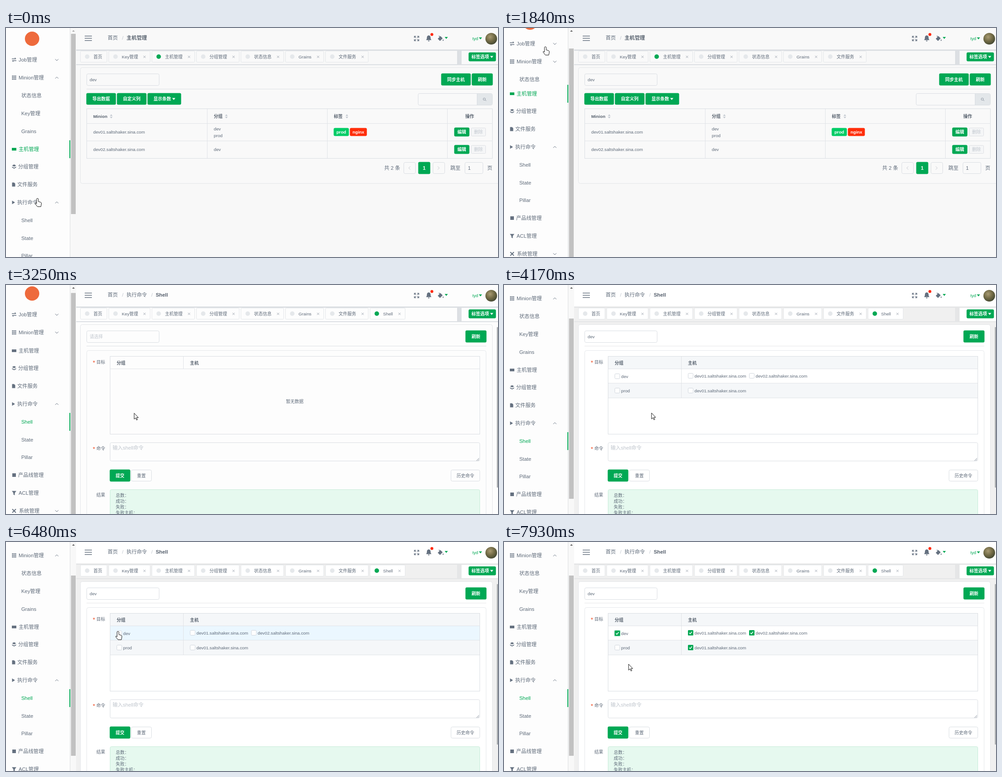
These frames come from a looping animation (1094x512 px, 8000 ms). An HTML page:

```html
<!DOCTYPE html>
<html lang="zh-CN">
<head>
<meta charset="utf-8">
<title>Shell</title>
<style>
html, body { margin: 0; width: 100%; height: 100%; overflow: hidden; background: #f8f8f8; }
#stage {
  --bg: #f8f8f8; --card: #f9f9f9; --head: #f8f8f8; --line: #dcdfe3;
  display: block; width: 1094px; height: 512px;
  font: 9.75px "Liberation Sans", Arial, "Noto Sans CJK SC", "Noto Sans CJK", sans-serif;
}
#stage.fresh { --bg: #fdfdfd; --card: #fdfdfd; --head: #fdfdfd; }
#stage.ready { --bg: #f0f0f0; --card: #fff; --head: #f5f7f9; --line: #e5e6e7; }
text { fill: #5e6a79; white-space: pre; }
.l { font-size: 11.375px; }
.b { font-weight: bold; fill: #56606d; }
.c { text-anchor: middle; }
.w { fill: #fff; font-weight: bold; }
.m { fill: #bfc5cd; }
.g { fill: #00a854; }
.star { font-size: 13px; fill: #ed3f14; }
.wide { font-family: "Liberation Sans", "Noto Sans CJK JP", "Noto Sans CJK", sans-serif; }
.bg { fill: var(--bg); }
.card { fill: var(--card); }
.head { fill: var(--head); }
.line { fill: var(--line); }
.edge { fill: none; stroke: #d9dde2; }
.soft { fill: none; stroke: #e4e7ea; }
.tab { fill: var(--card); stroke: #e3e6e9; }
.frame { fill: var(--card); stroke: #e3e5e8; }
.result { fill: #e6f9ef; stroke: #c5ebd7; }
.check { fill: #fff; stroke: #cfd5dc; }
.tick { fill: none; stroke: #fff; stroke-width: 1.5; }
.btn { fill: #00a854; }
.off { fill: #f5f6f7; stroke: #dddfe3; }
.ico { fill: #657180; }
.pen { fill: none; stroke: #657180; }
.thin { fill: none; stroke: #8b94a0; }
.item rect { fill: none; }
.item.hot .back { fill: #f2f2f2; }
.item.on .bar, .item.on .ico, .item.on text { fill: #00a854; }
.cur { fill: #fff; stroke: #111; stroke-linejoin: round; }
#ring { opacity: .2; }
</style>
</head>
<body>
<svg id="stage" viewBox="0 0 1094 512"></svg>
<script>
const LOOP = 8000, PITCH = 39.82, SUB = 119, RULE = '#e0e3e7';

// drawing helpers; text is placed by its vertical centre, paint is a colour or a class
const paint = p => p[0] === '#' ? `fill="${p}"` : `class="${p}"`;
const txt = (x, cy, s, cls = '') =>
  `<text x="${x}" y="${cy + (/\bl\b/.test(cls) ? 4 : 3.5)}" class="${cls}">${s}</text>`;
const fill = (x, y, w, h, p, r = 0) =>
  `<rect x="${x}" y="${y}" width="${w}" height="${h}" rx="${r}" ${paint(p)}/>`;
const box = (x, y, w, h, cls, r = 3) => fill(x + .5, y + .5, w - 1, h - 1, cls, r);
const solid = (x, y, w, h, p = 'btn') => fill(x - .4, y - .4, w + .8, h + .8, p, 3);
const path = (x, y, d, cls, extra = '') =>
  `<path transform="translate(${x} ${y})" d="${d}" class="${cls}" ${extra}/>`;
const group = (id, body, cls = '') => `<g id="${id}" class="${cls}">${body}</g>`;
const disc = (x, y, r, color) => `<circle cx="${x}" cy="${y}" r="${r}" fill="${color}"/>`;
const caret = (x, y, cls) => path(x, y, 'M-3.500-2H3.500L0 2.500Z', cls);
const cross = (x, y) => path(x, y, 'M-2.500-2.500l5 5m0-5l-5 5', 'thin', 'stroke-width=".8"');
const button = (x, y, w, h, s, p) => solid(x, y, w, h, p) + txt(x + w / 2, y + h / 2, s, 'w c');
const ghost = (x, y, w, h, s) => box(x, y, w, h, 'edge') + txt(x + w / 2, y + h / 2, s, 'c');
const sorter = (x, y) => path(x, y, 'M-3-1L0-4.500 3-1ZM-3 1L0 4.500 3 1Z', 'm');

// sidebar
const icons = {
  swap: ['M-5-2H4M1.500-4.500L4-2M5 2H-4M-1.500 4.500L-4 2', 'pen', 'stroke-width="1.3"'],
  grid: ['M-4.500-3.500h9M-4.500 0h9M-4.500 3.500h9', 'pen', 'stroke-width="2.300" stroke-dasharray="2.300 1.050"'],
  host: ['M-5-3H5V3H-5Z', 'ico'],
  layers: ['M0-5L4.500-2.500 0 0-4.500-2.500ZM-4.500 0L0 2.500 4.500 0V2L0 4.500-4.500 2Z', 'ico'],
  doc: ['M-4.500-4.500H0L2.500-2V4.500H-4.500Z', 'ico'],
  play: ['M-4.500-4L2-0-4.500 4Z', 'ico'],
  block: ['M-4-4H4V4H-4Z', 'ico'],
  funnel: ['M-5-4.500H5L1.500 0V5L-1.500 3.500V0Z', 'ico'],
  tools: ['M-4-4L4 4M4-4L-4 4', 'pen', 'stroke-width="2"']
};
const rowY = i => Math.round(71.45 + PITCH * i);
const chevron = (y, up) => path(113, y, up ? 'M-3.500 2L0-1.500 3.500 2' : 'M-3.500-1.500L0 2 3.500-1.500', 'pen');
const item = (i, x, label, icon, id = 'row' + i) => {
  const y = rowY(i);
  return group(id, fill(0, y - 20, 142, 40, 'back') + fill(141, y - 20, 2, 40, 'bar') +
    (icon ? path(18, y, ...icons[icon]) : '') + txt(x, y, label, 'l'), 'item');
};
const subTop = rowY(2) - 20;
const sidebar = fill(0, 0, 143, 512, '#fdfdfd') + fill(142, 0, 1, 512, '#dcdee0') +
  group('menu',
    disc(58, 24, 16, '#ee6a3c') +
    item(0, 28, 'Job管理', 'swap') + chevron(rowY(0), false) +
    item(1, 28, 'Minion管理', 'grid') +
    group('minionUp', chevron(rowY(1), true)) + group('minionDown', chevron(rowY(1), false)) +
    `<svg id="sub" x="0" y="${subTop}" width="143" height="${SUB}" overflow="hidden"><g transform="translate(0 ${-subTop})">` +
    item(2, 34, '状态信息', '', 'status') + item(3, 34, 'Key管理') + item(4, 34, 'Grains') + '</g></svg>' +
    group('lower',
      item(5, 28, '主机管理', 'host', 'hostItem') + item(6, 27, '分组管理', 'layers') +
      item(7, 25, '文件服务', 'doc') + item(8, 25, '执行命令', 'play') + chevron(rowY(8), true) +
      item(9, 34, 'Shell', '', 'shellItem') + item(10, 34, 'State') + item(11, 34, 'Pillar') +
      item(12, 27, '产品线管理', 'block') + item(13, 28, 'ACL管理', 'funnel') +
      item(14, 29, '系统管理', 'tools') + chevron(rowY(14), false))) +
  fill(144, 0, 12, 512, '#f8f8f8') +
  '<rect id="thumb" x="144.500" width="10.500" fill="#c1c1c1"/>' +
  '<path id="arrow" d="M147 8L150 5 153 8Z"/>';

// top bar and tabs
const tab = (x, w, label, color = '#e5e8eb') => box(x, 51, w, 26, 'tab', 2) +
  disc(x + 15.5, 64, 5, color) + txt(x + 29.5, 64.5, label) +
  (label === '首页' ? '' : cross(x + w - 13, 64.5));
const topBar = fill(156, 0, 938, 512, 'bg') + fill(156, 0, 938, 48, 'card') +
  fill(156, 48, 938, 3, 'line') + fill(156, 81, 938, 2, 'line') +
  path(175, 23, 'M0-5H16M0 0H16M0 5H16', 'pen', 'stroke-width="1.500"') +
  txt(226, 22, '首页', 'l') + txt(258, 22, '/', 'l m') +
  group('crumbHost', txt(268, 22, '主机管理', 'l b')) +
  group('crumbShell', txt(268, 22, '执行命令', 'l') + txt(323, 22, '/', 'l m') + txt(333, 22, 'Shell', 'l b')) +
  path(913, 23.5, 'M-5-1.500V-5H-1.500M1.500-5H5V-1.500M5 1.500V5H1.500M-1.500 5H-5V1.500M-4-4L-1.500-1.500M4-4L1.500-1.500M4 4L1.500 1.500M-4 4L-1.500 1.500', 'pen', 'stroke-width="1.300"') +
  path(940, 23, 'M-6 4Q-4 2-4-2Q-4-6 0-6.500Q4-6 4-2Q4 2 6 4ZM-2 5H2Q1.500 7 0 7Q-1.500 7-2 5Z', 'ico') +
  disc(947, 14.5, 3.2, '#ff2a0a') +
  path(966, 23, 'M-6 1L0-5 5 0-1 6ZM-3-6L0-3-1-2-4-5ZM6 2Q8 5 6 6Q4 5 6 2Z', 'ico') +
  caret(979, 22, 'g') + txt(1037, 23.5, 'tyd', 'g') + caret(1055, 23, 'g') +
  disc(1079, 24, 13, 'url(#photo)') +
  tab(165, 60, '首页') + tab(228, 93, 'Key管理') +
  group('tabHost', tab(324, 96, '主机管理', '#00a854')) +
  group('tabHostIdle', tab(324, 96, '主机管理')) +
  tab(423, 96, '分组管理') + tab(522, 96, '状态信息') + tab(621, 86, 'Grains') + tab(710, 96, '文件服务') +
  group('tabShell', tab(809, 79, 'Shell', '#00a854')) +
  fill(1003, 50, 10, 31, 'line') + fill(1013, 51, 81, 30, 'card') +
  solid(1029, 55, 60, 19) + txt(1035, 64.5, '标签选项', 'w') + caret(1080, 64.5, 'w');

// host list page
const hostRow = (y, n) => txt(194, y, `dev0${n}.saltshaker.sina.com`) +
  button(997, y - 9, 33, 19, '编辑') + box(1034, y - 9, 33, 19, 'off', 2) + txt(1050.5, y + .5, '删除', 'm c');
const hostPage = box(165, 88, 940, 260, 'frame', 4) +
  box(179, 102, 162, 27, 'edge') + txt(186, 115.5, 'dev') +
  button(968, 102, 65, 26, '同步主机') + button(1036, 102, 46, 26, '刷新') +
  fill(179, 136, 903, 1, 'line') +
  button(179, 146, 65, 25, '导出数据') + button(247, 146, 65, 25, '自定义列') +
  solid(315, 146, 74, 25) + txt(328, 158.5, '显示条数', 'w') + caret(373, 158.5, 'w') +
  box(916, 146, 166, 27, 'edge') + fill(1047, 147, 34, 25, '#e3e7ea') + fill(1047, 147, 1, 25, '#d9dde2') +
  path(1064, 159, 'M2 0A2.500 2.500 0 1 1-3 0A2.500 2.500 0 1 1 2 0M1.500 2L4 4', 'thin') +
  box(179, 180, 903, 112, 'edge', 0) +
  [213, 252].map(y => fill(179, y, 903, 1, RULE)).join('') +
  [447, 714, 981].map(x => fill(x, 181, 1, 110, RULE)).join('') +
  txt(194, 197.5, 'Minion', 'b') + sorter(234, 197.5) + txt(462, 197.5, '分组', 'b') + sorter(490, 197.5) +
  txt(729, 197.5, '标签', 'b') + sorter(758, 197.5) + txt(1031, 197.5, '操作', 'b c') +
  hostRow(232, 1) + hostRow(271, 2) +
  txt(462, 225, 'dev') + txt(462, 240, 'prod') + txt(462, 271.5, 'dev') +
  button(729, 224, 33, 17, 'prod', '#00cc66') + button(765, 224, 37, 17, 'nginx', '#ff2e0a') +
  txt(841, 313, '共 2 条', 'l') + box(884, 300, 27, 26, 'edge') + solid(917, 300, 26, 26) +
  box(949, 300, 27, 26, 'edge') + txt(930, 313, '1', 'l w c') +
  path(897, 313, 'M2-3.500L-1.500 0 2 3.500', 'thin', 'opacity=".5"') +
  path(962, 313, 'M-2-3.500L1.500 0-2 3.500', 'thin', 'opacity=".5"') +
  txt(988, 313, '跳至', 'l') + box(1020, 300, 41, 26, 'edge') + txt(1027, 313, '1', 'l') + txt(1070, 313, '页', 'l');

// shell page
const check = (x, y, label, id) => box(x, y, 12, 12, 'check', 2) +
  group(id, fill(x, y, 12, 12, 'btn', 1.5) + path(x + 6, y + 6, 'M-3 0L-1 2.500 3-2.500', 'tick')) +
  txt(x + 14.5, y + 6.5, label);
const shellPage = box(165, 88, 917, 440, 'frame', 4) +
  box(179, 102, 162, 27, 'edge') + group('pick', txt(186, 115.5, '请选择', 'm')) + group('picked', txt(186, 115.5, 'dev')) +
  button(1022, 102, 46, 26, '刷新') + fill(179, 136, 889, 1, 'line') +
  box(179, 146, 889, 400, 'soft', 4) +
  txt(193, 174, '*', 'star') + txt(201, 172, '目标') +
  txt(193, 367, '*', 'star') + txt(201, 365, '命令') + txt(201, 469, '结果') +
  fill(231, 160, 823, 28, 'head') +
  group('rows', fill(231, 220, 823, 32, '#f5f7f9') +
    group('hover', fill(231, 188, 823, 32, '#ebf7ff')) +
    fill(231, 219, 823, 1, RULE) + fill(231, 252, 823, 1, RULE) + fill(394, 188, 1, 64, RULE) +
    group('ring', fill(244.4, 196.4, 15.2, 15.2, 'btn', 3)) +
    check(246, 198, 'dev', 'devAll') + check(246, 230, 'prod', 'prodAll') +
    check(409, 197, 'dev01.saltshaker.sina.com', 'dev1') + check(545, 197, 'dev02.saltshaker.sina.com', 'dev2') +
    check(409, 230, 'dev01.saltshaker.sina.com', 'prod1')) +
  group('empty', txt(642, 260.5, '暂无数据', 'c')) +
  box(231, 159, 823, 175, 'edge', 0) + fill(231, 187, 823, 1, RULE) + fill(394, 160, 1, 28, RULE) +
  txt(246, 174, '分组', 'b') + txt(409, 174, '主机', 'b') +
  box(231, 352, 823, 42, 'edge') + txt(237, 364, '输入shell命令', 'l m') +
  path(1049, 390, 'M-3 3L3-3M0 3L3 0', 'thin') +
  button(231, 413, 45, 26, '提交') + ghost(278, 413, 46, 26, '重置') + ghost(989, 413, 65, 26, '历史命令') +
  box(231, 457, 823, 80, 'result') +
  ['总数', '成功', '失败', '失败主机'].map((s, i) => txt(244, 470.5 + 13 * i, s + '：', 'wide')).join('') +
  fill(1091.5, 94, 2.5, 359, '#a6a9ac', 1);

const stage = document.getElementById('stage');
stage.innerHTML =
  `<defs><radialGradient id="photo" cx=".4" cy=".35" r=".75"><stop stop-color="#a89a72"/>
   <stop offset=".5" stop-color="#716a45"/><stop offset="1" stop-color="#39402f"/></radialGradient></defs>` +
  topBar + group('hostPage', hostPage) + group('shellPage', shellPage) + sidebar +
  group('pointer',
    group('hand', path(0, 0, 'M-2 1.500Q-2 0 0 0Q2 0 2 1.500V7L7 8.500Q9 9 8.700 12L7.500 18.500H0L-5 12Q-5 9.500-3.500 10.500L-2 12Z', 'cur')) +
    group('tip', path(0, 0, 'M0 0V13.500L3.200 10.700L5.300 15.500L7.300 14.600L5.200 10H9.300Z', 'cur')));

// timing: the screen refreshes only at these moments
const ticks = [0, 430, 580, 700, 820, 940, 1090, 1220, 1340, 1460, 1600, 1720, 1840, 1960, 2080, 2240,
  2380, 2500, 2620, 2740, 2980, 3100, 3250, 3370, 3490, 3640, 4170, 5820, 5970, 6120, 6240, 6360, 6480,
  7200, 7350, 7510, 7660, 7780, 7930];
const cursor = [[0, 70, 381], [430, 70, 381], [940, 82, 74], [1090, 89, 49], [1460, 104, 27], [1720, 104, 27],
  [2080, 68, 72], [2240, 69, 161], [2620, 51, 294], [2740, 50, 298], [3100, 53, 305], [3250, 285, 286.5],
  [3490, 328, 286], [4170, 328, 286], [5820, 301, 267], [5970, 267, 233], [6240, 249, 203], [6480, 249, 200],
  [7510, 249, 200], [7780, 269, 258], [7930, 277, 273]];
const ramp = (t, a, b) => Math.min(1, Math.max(0, (t - a) / (b - a)));

function along(points, t) {
  const i = points.findIndex(p => p[0] > t);
  if (i < 0) return points.at(-1).slice(1);
  const [a, b] = [points[i - 1], points[i]], k = ramp(t, a[0], b[0]);
  return [a[1] + (b[1] - a[1]) * k, a[2] + (b[2] - a[2]) * k];
}

const el = id => document.getElementById(id);
const show = (on, ...ids) => ids.forEach(id => el(id).style.display = on ? '' : 'none');
const attr = (id, values) => Object.entries(values).forEach(([k, v]) => el(id).setAttribute(k, v));

function draw(now) {
  const t = ticks.findLast(k => k <= now % LOOP);
  const shell = t >= 3250, ready = t >= 3490, rows = t >= 3640;

  // folding shortens the menu, which limits how far it can be scrolled
  const fold = ramp(t, 1500, 1960) - ramp(t, 3250, 3490);
  const folded = Math.round(SUB * fold);
  const scroll = Math.round(Math.min(81 * ramp(t, 300, 940), SUB + 5 - folded));
  attr('menu', { transform: `translate(0 ${-scroll})` });
  attr('sub', { height: SUB - folded });
  attr('lower', { transform: `translate(0 ${-folded})` });
  attr('thumb', { y: 13 + scroll * (.765 + .2 * fold), height: 403 + 96 * fold });
  attr('arrow', { fill: scroll ? '#505050' : '#a3a3a3' });
  show(fold <= .5, 'minionUp');
  show(fold > .5, 'minionDown');
  el('status').classList.toggle('hot', t >= 940 && t < 1600);
  el('hostItem').classList.toggle('on', !shell);
  el('shellItem').classList.toggle('on', shell);
  el('shellItem').classList.toggle('hot', t >= 2500 && !shell);

  stage.setAttribute('class', ready ? 'ready' : shell ? 'fresh' : '');
  show(!shell, 'hostPage', 'crumbHost', 'tabHost');
  show(shell, 'shellPage', 'crumbShell', 'tabHostIdle', 'tabShell');
  show(!ready, 'pick');
  show(ready, 'picked');
  show(rows, 'rows');
  show(!rows, 'empty');
  show(t >= 6120 && t < 7930, 'hover');
  show(t >= 7200, 'ring');
  show(false, 'prodAll');
  for (const id of ['devAll', 'dev1', 'dev2', 'prod1']) el(id).style.opacity = t >= 7510 ? 1 : t >= 7350 ? .6 : 0;

  const hand = !shell || (t >= 6240 && t < 7660);
  show(hand, 'hand');
  show(!hand, 'tip');
  attr('pointer', { transform: `translate(${along(cursor, t).join(' ')})` });
}

const start = performance.now();
function loop() {
  draw(performance.now() - start);
  requestAnimationFrame(loop);
}
loop();
</script>
</body>
</html>
```
